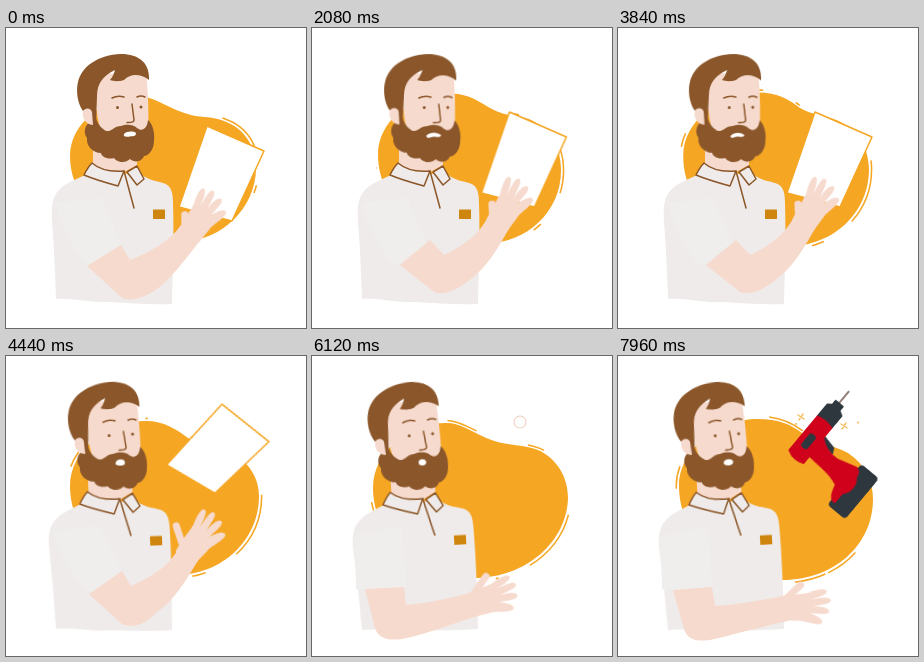
Write an HTML page that moves like this. It is 300 by 300 pixels and loops after 8000 ms.

```html
<!DOCTYPE html>
<html lang="en">
<head>
<meta charset="utf-8">
<title>Man tossing paper</title>
<style>
html, body { margin: 0; width: 100%; height: 100%; overflow: hidden; background: #fff; }
svg { display: block; width: 100vw; height: 100vh; }
svg * { animation: 8s linear infinite; }
.skin { fill: #f6dace; }
.hair { fill: #8b572a; }
.shirt { fill: #efebea; }
.line { fill: none; stroke: #8b572a; stroke-width: 1.5; stroke-linecap: round; stroke-linejoin: round; }

.blob { animation-name: blob; fill: #f5a623; }
.trails path { fill: none; stroke: #f5a623; stroke-width: 1.5; animation-name: blob, var(--trail); }
.trails { transform: translate(158px, 142px) scale(1.028, 1.034) translate(-158px, -142px); }
.body { transform-origin: 108px 273px; animation-name: lean; }
.head { transform-origin: 110px 150px; animation-name: nod; }
.brows { animation-name: brows; }
.mouth { fill: #fff; animation-name: talk; }
.sleeve { fill: #f0eeed; animation-name: sleeve; }
.arm { animation-name: arm; }
.hand { animation-name: hand; }
.thumb { animation-name: thumb; fill: none; stroke: #f6dace; stroke-width: 7; stroke-linecap: round; }
.paper { animation-name: paper; fill: #fff; stroke: #f5a623; stroke-width: 1.5; stroke-linejoin: round; }
.ring { animation-name: ring; fill: none; stroke: #f3cdbc; }
.drill { animation-name: drill; }
.sparks { animation-name: sparks; fill: none; stroke: #f5bd62; stroke-width: 1.4; stroke-linecap: round; }

@keyframes blob {
  0% { d: path("M138,69C150,70 165,82 185,87C198,90 206,88 218,93C238,100 250,118 250,140C250,180 215,212 180,213C110,216 64,175 64,128C64,95 100,66 138,69Z"); }
  15.5% { d: path("M138,67C155,68 165,80 180,86C198,92 205,88 220,93C238,102 250,118 250,142C250,182 215,214 176,214C110,216 65,175 65,128C65,94 100,65 138,67Z"); }
  37% { d: path("M142,64C160,64 170,68 180,76C190,85 205,86 216,90C236,98 248,118 248,143C248,185 215,217 170,217C110,217 67,175 67,125C67,90 105,64 142,64Z"); }
  55.5% { d: path("M140,65C158,65 170,73 182,82C196,89 213,89 224,95C243,106 253,122 253,140C253,185 215,219 170,219C110,219 64,180 64,130C64,95 100,65 140,65Z"); }
  76.5% { d: path("M136,67C155,68 170,85 196,88C208,90 216,90 226,94C244,102 256,120 256,142C255,185 215,222 162,222C105,222 61,180 61,132C61,95 98,66 136,67Z"); }
  91% { d: path("M138,65C160,65 176,78 192,83C206,86 218,88 228,95C246,106 256,122 256,143C256,185 210,222 165,222C105,222 62,180 62,135C62,98 98,65 138,65Z"); }
  99.5%, 100% { d: path("M140,63C160,63 172,68 184,77C196,87 216,89 230,97C247,108 255,125 255,143C255,190 215,224 165,224C105,224 61,180 61,130C61,94 100,63 140,63Z"); }
}
@keyframes right {
  0% { stroke-dasharray: 8.5 200; stroke-dashoffset: -15.5; }
  15.5% { stroke-dasharray: 4.5 200; stroke-dashoffset: -24; }
  37% { stroke-dasharray: 12 200; stroke-dashoffset: -24; }
  55.5% { stroke-dasharray: 12 200; stroke-dashoffset: -27; }
  76.5% { stroke-dasharray: 11.5 200; stroke-dashoffset: -31; }
  91% { stroke-dasharray: 5.5 200; stroke-dashoffset: -35; }
  99.5%, 100% { stroke-dasharray: 6 200; stroke-dashoffset: -37.5; }
}
@keyframes low {
  0% { stroke-dasharray: 1.5 200; stroke-dashoffset: -31; }
  15.5% { stroke-dasharray: 1.5 200; stroke-dashoffset: -36; }
  37% { stroke-dasharray: 2 200; stroke-dashoffset: -42; }
  55.5% { stroke-dasharray: 2.5 200; stroke-dashoffset: -45.5; }
  76.5% { stroke-dasharray: .5 200; stroke-dashoffset: -48.5; }
  91% { stroke-dasharray: 5 200; stroke-dashoffset: -41; }
  99.5%, 100% { stroke-dasharray: 5.5 200; stroke-dashoffset: -44; }
}
@keyframes top {
  0%, 25% { stroke-dasharray: 0 200; stroke-dashoffset: 0; }
  37% { stroke-dasharray: 1.5 200; stroke-dashoffset: 0; }
  55.5% { stroke-dasharray: .4 200; stroke-dashoffset: 0; }
  76.5% { stroke-dasharray: 5.5 200; stroke-dashoffset: 0; }
  91% { stroke-dasharray: 6 200; stroke-dashoffset: -1; }
  99.5%, 100% { stroke-dasharray: 6.5 200; stroke-dashoffset: -2; }
}
@keyframes dip {
  0% { stroke-dasharray: 0 200; stroke-dashoffset: -15; }
  15.5% { stroke-dasharray: 1.5 200; stroke-dashoffset: -18.5; }
  37% { stroke-dasharray: 1.7 200; stroke-dashoffset: -4.8; }
  55.5% { stroke-dasharray: .4 200; stroke-dashoffset: -9; }
  76.5% { stroke-dasharray: 3 200; stroke-dashoffset: -15; }
  91% { stroke-dasharray: 2 200; stroke-dashoffset: -8; }
  99.5%, 100% { stroke-dasharray: 0 200; stroke-dashoffset: -10; }
}
@keyframes left {
  0%, 25% { stroke-dasharray: 0 200; stroke-dashoffset: -77; }
  37% { stroke-dasharray: 2 200; stroke-dashoffset: -78.5; }
  55.5% { stroke-dasharray: 3 200; stroke-dashoffset: -83; }
  76.5% { stroke-dasharray: 2.5 200; stroke-dashoffset: -75; }
  91% { stroke-dasharray: 6 200; stroke-dashoffset: -75; }
  99.5%, 100% { stroke-dasharray: 4 200; stroke-dashoffset: -79; }
}
@keyframes lean {
  0%, 51% { transform: rotate(0deg); }
  55.5% { transform: rotate(-1.9deg); }
  66%, 76.5% { transform: rotate(-3.2deg); }
  91% { transform: rotate(-2.4deg); }
  99.5%, 100% { transform: rotate(-3.2deg); }
}
@keyframes nod {
  0% { transform: translateX(0) rotate(0deg); }
  15.5% { transform: translateX(0) rotate(1.4deg); }
  37%, 51% { transform: translateX(-1px) rotate(.6deg); }
  55.5% { transform: translateX(-1.5px) rotate(-.4deg); }
  76.5%, 100% { transform: translateX(-2.5px) rotate(-.8deg); }
}
@keyframes brows {
  0%, 51% { transform: translateY(0); }
  55.5%, 100% { transform: translateY(-4px); }
}
@keyframes talk {
  0% { d: path("M118,106C121,103 127,103 130,105C130,109 126,108 124,108.500C120,109 117,109 118,106Z"); }
  15.5% { d: path("M115,107C119,103 127,103 131,107C129,110 127,108 123,108.500C119,109 116,112 115,107Z"); }
  37%, 50% { d: path("M113,108C117,104 123,104 127,107C126,110 123,108 120,108.500C117,108 114,112 113,108Z"); }
  55.5% { d: path("M117,107C118,103 125,103 126,106C127,109 125,110 122,110C119,110 116,109 117,107Z"); }
  76.5%, 91% { d: path("M119,107C119,103 125,103 126.500,106C127,109 125,110 123,110C120,110 119,109 119,107Z"); }
  99.5%, 100% { d: path("M118,107C119,103 126,103 127.500,106C128,109 125,110 123,110C120,110 118,109 118,107Z"); }
}
@keyframes sleeve {
  0%, 52% { d: path("M50,175C54,195 68,222 82,238L115,216L95,170Z"); }
  55.5% { d: path("M48,175C52,195 68,222 84,238L116,215L93,170Z"); }
  69%, 100% { d: path("M42,180C43,200 44,215 44,233C60,235 80,233 94,231L90,170Z"); }
}
@keyframes arm {
  0% { d: path("M81,238L115,217L124,232C145,224 165,212 175,197L197,209C180,230 165,252 148,263C135,271 125,273 116,270Z"); }
  10.5%, 52% { d: path("M88,237L118,212L132,227C150,219 168,206 177,187L199,197C186,220 175,240 155,254C140,265 130,267 122,264Z"); }
  55.5% { d: path("M83,238L116,215L125,230C145,221 165,210 174,189L194,201C180,225 168,245 150,257C138,270 126,272 116,268Z"); }
  63% { d: path("M66,235L102,224L109,242C130,236 150,230 162,217L178,235C160,250 145,261 123,270C105,278 93,279 86,270Z"); }
  69%, 76.5% { d: path("M53,233L92,231L94,249C115,247 135,243 157,237L168,259C140,268 115,278 90,283C75,285 66,282 63,272Z"); }
  91% { d: path("M53,233L93,231L96,249C115,247 140,244 163,239L171,261C145,269 115,279 90,284C75,285 66,282 63,272Z"); }
  99.5%, 100% { d: path("M55,234L94,231L97,250C115,249 140,245 166,240L170,265C145,270 115,279 92,284C77,286 69,283 66,273Z"); }
}
@keyframes hand {
  0% { transform: translate(186px, 203px) rotate(28deg); }
  10.5%, 52% { transform: translate(188px, 192px) rotate(25deg); }
  55.5% { transform: translate(184px, 195px) rotate(32deg); }
  63% { transform: translate(170px, 226px) rotate(49deg); }
  69%, 76.5% { transform: translate(163px, 248px) rotate(64deg); }
  91% { transform: translate(167px, 250px) rotate(70deg); }
  99.5%, 100% { transform: translate(168px, 252px) rotate(80deg); }
}
@keyframes thumb {
  0%, 52% { d: path("M-8,0L-14,-11"); }
  55.5% { d: path("M-8,0L-25,-14"); }
  69%, 91% { d: path("M-8,0L-20,-22"); }
  100% { d: path("M-8,0L-20,-18"); }
}
@keyframes paper {
  0% { transform: translate(214px, 148px); }
  10.5% { transform: translate(211px, 134px); }
  37%, 51.5% { transform: translate(210px, 134px); d: path("M-13,-50L44,-25L12,45L-41,31Z"); }
  55.5% { transform: translate(213px, 94px) rotate(20deg); d: path("M-13,-44L44,-25L11,42L-44,32Z"); }
  59% { transform: translate(217px, 82px) rotate(60deg) scale(.97); }
  64% { transform: translate(221px, 80px) rotate(125deg) scale(.95); }
  73%, 100% { transform: translate(208px, 66px) rotate(240deg) scale(0); d: path("M-13,-44L44,-25L11,42L-44,32Z"); }
}
@keyframes ring {
  0%, 73% { transform: translate(208px, 66px) scale(0); opacity: 1; }
  76.5% { transform: translate(208px, 66px) scale(1); opacity: 1; }
  79%, 100% { transform: translate(208px, 66px) scale(1.4); opacity: 0; }
}
@keyframes drill {
  0%, 78% { transform: translate(205px, 68px) rotate(246deg) scale(0); }
  91% { transform: translate(204px, 86px) rotate(67deg) scale(.54); }
  99.5% { transform: translate(219px, 98px) rotate(-50deg) scale(1); }
  100% { transform: translate(220px, 99px) rotate(-57deg) scale(1.02); }
}
@keyframes sparks {
  0%, 95% { opacity: 0; }
  99%, 100% { opacity: 1; }
}
</style>
</head>
<body>
<svg viewBox="0 0 300 300">
  <path class="blob"/>
  <g class="trails">
    <path pathLength="100" style="--trail:right"/>
    <path pathLength="100" style="--trail:low"/>
    <path pathLength="100" style="--trail:top"/>
    <path pathLength="100" style="--trail:dip"/>
    <path pathLength="100" style="--trail:left"/>
  </g>

  <g class="body">
    <path class="shirt" d="M86,143C75,150 62,153 54,161C46,168 45,180 46,193C48,220 49,240 50,271C70,270 82,275 104,274C125,275 145,277 166,276C167,240 168,205 167,175C167,164 165,157 157,155C150,153 143,152 136,147Z"/>
    <path class="skin" d="M87,105V140C98,148 112,148 120,143L131,137V115Z"/>
    <g class="head">
      <path class="skin" d="M92,46C88,75 91,100 100,112L142,106C143,85 142,60 140,44Z"/>
      <path class="hair" d="M143,52C135,46 125,45 118,52C112,54 107,53 104,52C107,49 108,45 109,42C97,48 91,55 91,68L90,98L84,97C88,85 84,78 77,83C71,75 70,62 72,54C76,38 92,27 115,26C134,26 144,36 143,52Z"/>
      <path class="hair" d="M89,82C89,92 93,99 100,103C106,104 108,98 115,98C120,96 127,96 131,100C136,104 141,101 142,92C147,96 149,106 148,113C148,121 143,128 138,128C136,134 128,135 124,131C119,136 110,134 108,130C101,132 95,128 95,125C87,125 80,118 81,110C77,105 79,97 83,95Z"/>
      <path class="skin" d="M87,97C79,96 76,90 77,84C79,79 85,80 86,84Z"/>
      <path class="line brows" d="M106,70Q112,67 118,69M131,69Q135,67 139,69"/>
      <path class="line" d="M126,76L128,92Q128,95 121,94.500"/>
      <g class="hair"><circle cx="111.500" cy="79.500" r="1.500"/><circle cx="135" cy="79" r="1.500"/></g>
      <path class="mouth"/>
    </g>
    <path class="line shirt" style="fill:#efebea" d="M86,135C82,139 80,143 78,147C90,152 101,155 112,158L118,143C106,144 94,142 86,135ZM121,144L131,138L138,151L131,157Z"/>
    <path class="line" d="M118,143L128,180"/>
    <rect x="147" y="181.500" width="12" height="9.500" rx=".5" fill="#cf860f"/>
  </g>

  <path class="sleeve"/>
  <path class="paper" d="M-13,-50L44,-25L12,45L-41,31Z"/>
  <circle class="ring" r="6"/>

  <g class="sparks">
    <path d="M180,59L186,63M185,58L181,64M223,68L229,72M228,67L224,73"/>
    <path d="M178,68h.1M240,66.500h.1" stroke-width="2"/>
  </g>
  <g class="drill">
    <g transform="translate(-5 -30)" fill="#2f373e">
      <path d="M44,-1H61" stroke="#5a3a30" stroke-width="1.300"/>
      <path d="M22,-9H37L40,-5H45V4H40L37,9H22Z" stroke="#2f373e" stroke-linejoin="round" stroke-width="2"/>
      <path d="M3,10H11L8,24L2,27Z"/>
      <rect x="-40" y="55" width="53" height="23" rx="4"/>
      <path d="M-23,-10H22Q25,0 22,10H9C3,17 1,25 2,34L8,54Q6,60 0,60C-6,66 -16,66 -22,60H-34Q-37,52 -20,48C-15,37 -16,24 -15,11H-24Q-29,0 -23,-10Z" fill="#d0021b"/>
      <rect x="-12" y="-4" width="17" height="8" rx="3"/>
    </g>
  </g>

  <path class="arm skin"/>
  <g class="hand">
    <path class="skin" d="M-12,8C-13,-4 -11,-14 -11,-24C-13,-34 -13,-42 -10,-43C-6,-44 -5,-34 -4,-26C-4,-36 -4,-45 0,-45.500C4,-45 3,-36 3,-26C4,-34 7,-43 11,-42C15,-40 11,-31 9,-22C12,-28 17,-35 21,-33C24,-30 18,-20 15,-12C14,-5 12,2 11,8Z"/>
    <path class="thumb"/>
  </g>
</svg>
</body>
</html>
```
